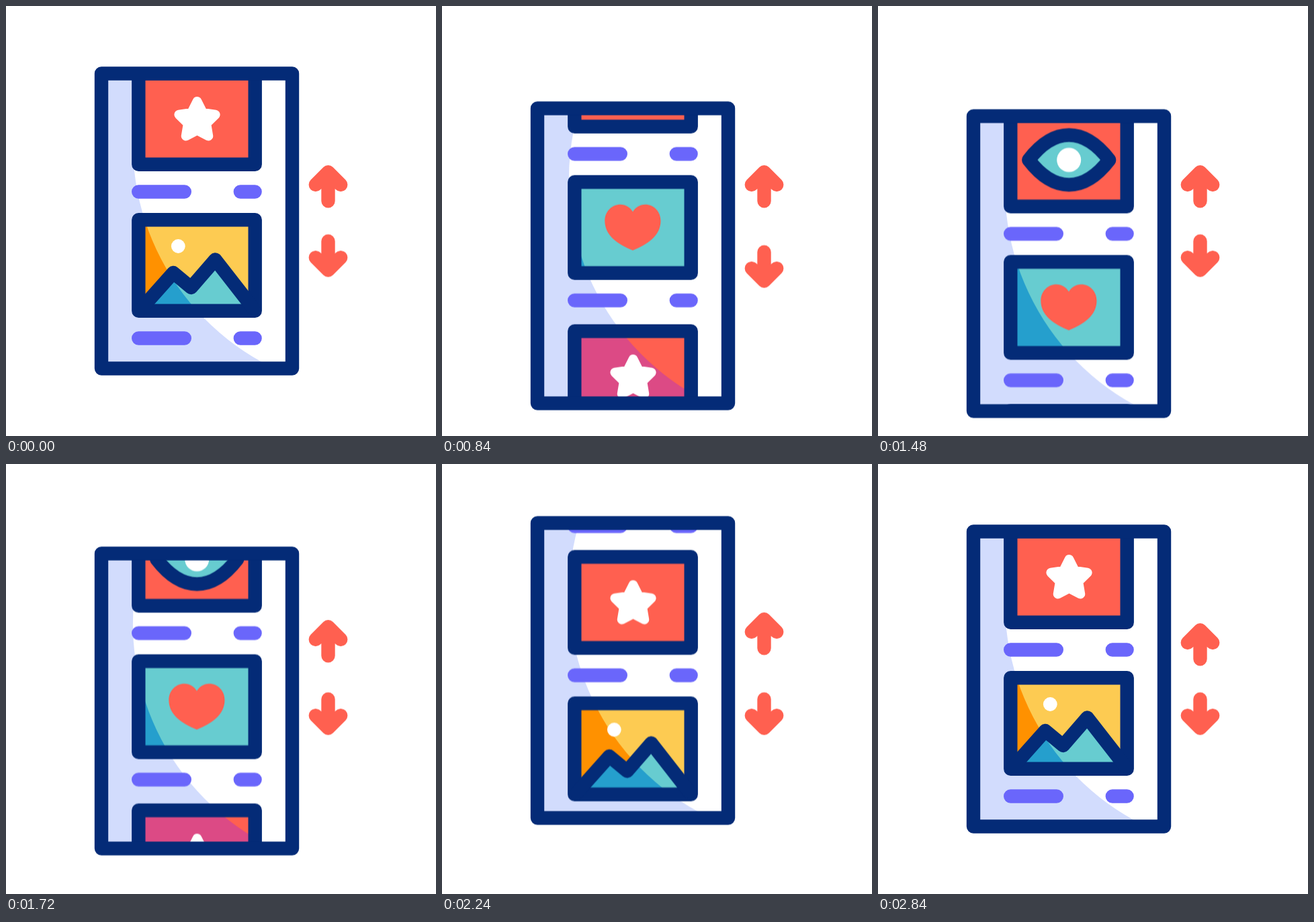
Write an HTML page that moves like this. It is 640 by 640 pixels and loops after 3000 ms.

```html
<!DOCTYPE html>
<html lang="en">
<head>
<meta charset="utf-8">
<title>Scrolling feed</title>
<style>
html, body { margin: 0; width: 100%; height: 100%; overflow: hidden; background: #fff; }
svg { display: block; width: 100vw; height: 100vh; }
.phone, .feed, .up, .down { animation: 3s linear infinite; }
.phone { animation-name: phone; }
.feed { animation-name: feed; }
.up { animation-name: up; }
.down { animation-name: down; }
.line { fill: none; stroke: #042b77; stroke-width: 20.4; stroke-linejoin: round; stroke-linecap: round; }
.bar { stroke: #6a66fb; }
.arrow { stroke: #ff6050; }
.white { fill: #fff; }
.red { fill: #ff6050; }
.pink { fill: #dc4a85; }
.yellow { fill: #fdcb52; }
.orange { fill: #ff9100; }
.teal { fill: #67ccd0; }
.blue { fill: #259fcd; }
.lilac { fill: #d2dcfd; }

@keyframes phone {
  0%, 6.667% { transform: translateY(0); animation-timing-function: cubic-bezier(.5, 0, .25, 1); }
  45.333% { transform: translateY(65.5px); animation-timing-function: cubic-bezier(.5, 0, .25, 1); }
  77.333% { transform: translateY(-13px); animation-timing-function: cubic-bezier(.5, 0, .25, 1); }
  94.667%, 100% { transform: translateY(0); }
}
@keyframes feed {
  0%, 6.667% { transform: translateY(0); animation-timing-function: cubic-bezier(.467, 0, .323, 1); }
  45.333% { transform: translateY(440px); }
  48% { transform: translateY(440px); animation-timing-function: cubic-bezier(.45, 0, .3, 1); }
  88.667%, 100% { transform: translateY(0); }
}
@keyframes down {
  0%, 6.667% { transform: translateY(0); animation-timing-function: cubic-bezier(.37, 0, .63, 1); }
  21.333% { transform: translateY(28.4px); animation-timing-function: cubic-bezier(.37, 0, .63, 1); }
  36%, 100% { transform: translateY(0); }
}
@keyframes up {
  0%, 53.333% { transform: translateY(0); animation-timing-function: cubic-bezier(.37, 0, .63, 1); }
  68% { transform: translateY(-28.4px); animation-timing-function: cubic-bezier(.37, 0, .63, 1); }
  82.667%, 100% { transform: translateY(0); }
}
</style>
</head>
<body>
<svg viewBox="0 0 640 640">
  <defs>
    <path id="shade" d="M142 106H202.5A370 370 0 0 0 381 530H142Z"/>
    <clipPath id="shadeClip"><use href="#shade"/></clipPath>
    <clipPath id="screen"><rect x="147" y="105" width="274" height="430"/></clipPath>
    <rect id="panel" x="197.3" y="10.2" width="173.4" height="135.6"/>
    <path id="hills" d="M200 144L249 89L275.5 111L311.5 69.5L368 142"/>
    <g id="card">
      <use href="#panel" class="line"/>
      <path class="line bar" d="M197.2 186.5H265.8M348.8 186.5H370.6"/>
    </g>
    <path id="arrow" class="line arrow" d="M479.5 290.3V247.3M460.8 266L479.5 247.3L498.2 266"/>
  </defs>

  <g class="phone">
    <rect class="white" x="142" y="100.5" width="284" height="439"/>
    <use href="#shade" class="lilac"/>
    <g clip-path="url(#screen)">
      <g class="feed">
        <use href="#panel" y="-350" class="red"/>
        <use href="#panel" y="-132" class="teal"/>
        <use href="#panel" y="90" class="red"/>
        <use href="#panel" y="308" class="yellow"/>
        <use href="#hills" y="308" class="teal"/>
      </g>
      <g clip-path="url(#shadeClip)">
        <g class="feed">
          <use href="#panel" y="-350" class="pink"/>
          <use href="#panel" y="-132" class="blue"/>
          <use href="#panel" y="90" class="pink"/>
          <use href="#panel" y="308" class="orange"/>
          <use href="#hills" y="308" class="blue"/>
        </g>
      </g>
      <g class="feed">
        <g transform="translate(0 -350)">
          <use href="#card"/>
          <path class="line" style="fill:#67ccd0" d="M224.3 76.5C262 27.2 306.5 27.2 344.2 76.5C306.5 125.8 262 125.8 224.3 76.5Z"/>
          <circle class="white" cx="284.2" cy="76.5" r="18"/>
        </g>
        <g transform="translate(0 -132)">
          <use href="#card"/>
          <path class="red" d="M284 112C262 103 242.3 90 242.3 68C242.3 54 253 43.7 265.5 43.7C273.5 43.7 280 48 284 54.5C288 48 294.5 43.7 302.5 43.7C315 43.7 325.5 54 325.5 68C325.5 90 306 103 284 112Z"/>
        </g>
        <g transform="translate(0 90)">
          <use href="#card"/>
          <path id="star" fill="#fff" stroke="#fff" stroke-width="14" stroke-linejoin="round"/>
        </g>
        <g transform="translate(0 308)">
          <use href="#card"/>
          <circle class="white" cx="256.3" cy="49.5" r="10.4"/>
          <use href="#hills" class="line"/>
        </g>
      </g>
    </g>
    <rect class="line" x="142" y="100.5" width="284" height="439"/>
  </g>

  <g class="up"><use href="#arrow"/></g>
  <g class="down"><use href="#arrow" transform="matrix(1 0 0 -1 0 640.4)"/></g>
</svg>
<script>
const points = Array.from({ length: 10 }, (_, i) => {
  const r = i % 2 ? 14.3 : 28.5;
  const a = i * Math.PI / 5;
  return `${(284.5 + r * Math.sin(a)).toFixed(2)} ${(80.5 - r * Math.cos(a)).toFixed(2)}`;
});
document.getElementById('star').setAttribute('d', `M${points.join('L')}Z`);
</script>
</body>
</html>
```
